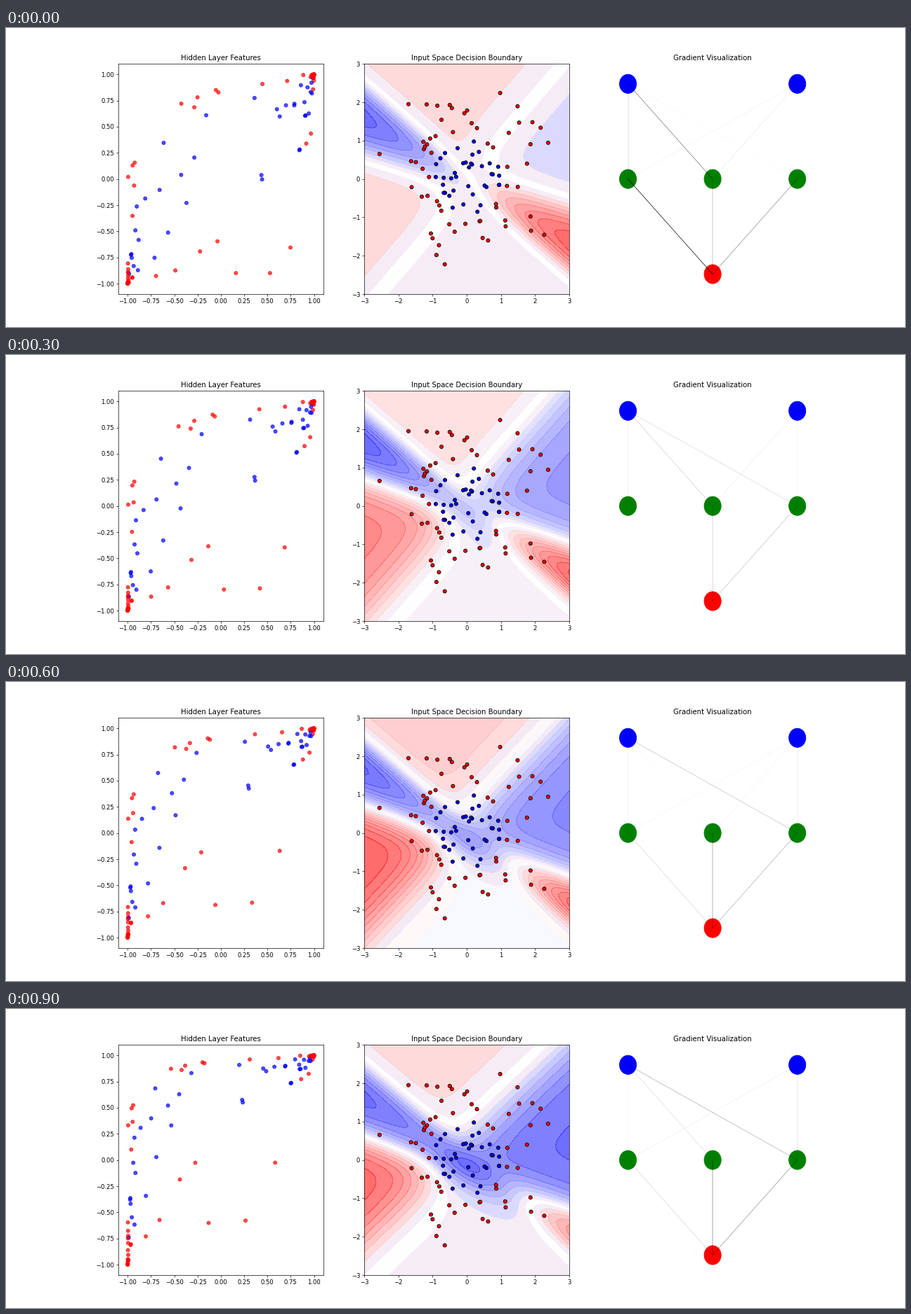
Recreate the animation shown at these times as a matplotlib script. Size 1280x427 px, loop 1000 ms.

```python
import numpy as np
import matplotlib.pyplot as plt
from matplotlib.animation import FuncAnimation
from matplotlib.colors import ListedColormap
from matplotlib.patches import Circle

DPI = 1280 / 21
FRAMES = 10
STEPS_PER_FRAME = 10
RATE = 0.1


def make_data(count=100):
    np.random.seed(0)
    points = np.random.randn(count, 2)
    labels = np.where((points ** 2).sum(axis=1) > 1, 1, -1)
    return points, labels


class Network:
    """Two inputs, three tanh units and one linear output."""

    def __init__(self):
        np.random.seed(0)
        self.w1 = np.random.randn(2, 3)
        self.w2 = np.random.randn(3, 1)
        self.b1 = np.zeros(3)
        self.b2 = np.zeros(1)

    def hidden(self, x):
        return np.tanh(x @ self.w1 + self.b1)

    def predict(self, x):
        return self.hidden(x) @ self.w2 + self.b2

    def train(self, x, y):
        h = self.hidden(x)
        error = (h @ self.w2 + self.b2 - y[:, None]) / len(x)
        back = error @ self.w2.T * (1 - h ** 2)
        g1, g2 = x.T @ back, h.T @ error
        self.w1 -= RATE * g1
        self.b1 -= RATE * back.sum(axis=0)
        self.w2 -= RATE * g2
        self.b2 -= RATE * error.sum(axis=0)
        return g1, g2


def boundary_map():
    """Blue to white to red, with lavender for the palest tints."""
    t = np.linspace(-1, 1, 256)
    tint = 1 - abs(t)
    red = np.where(t > 0, 1, tint)
    blue = np.where(t < 0, 1, tint)
    pale = (abs(t) > 0.06) & (abs(t) < 0.18)
    red[pale] = blue[pale] = (1 + tint[pale]) / 2
    return ListedColormap(np.column_stack([red, tint, blue]))


def record(x, y, grid):
    """Train once and keep what each frame shows."""
    net = Network()
    for _ in range(STEPS_PER_FRAME):
        net.train(x, y)
    states = []
    for _ in range(FRAMES):
        for _ in range(STEPS_PER_FRAME):
            g1, g2 = net.train(x, y)
        states.append((net.hidden(x), net.predict(grid), g1, g2))
    return states


X, Y = make_data()
XX, YY = np.meshgrid(np.linspace(-3, 3, 100), np.linspace(-3, 3, 100))
STATES = record(X, Y, np.column_stack([XX.ravel(), YY.ravel()]))
TINTS = boundary_map()

INPUTS = [(0, 1), (1, 1)]
HIDDEN = [(0, 0.5), (0.5, 0.5), (1, 0.5)]
OUTPUT = [(0.5, 0)]

# The tiny surplus keeps the pixel size from rounding down.
fig = plt.figure(figsize=(1280.001 / DPI, 427.001 / DPI), dpi=DPI)
ax_hidden, ax_input, ax_grad = (fig.add_subplot(1, 3, i) for i in (1, 2, 3))


def draw_hidden(h):
    ax_hidden.clear()
    ax_hidden.scatter(h[:, 0], h[:, 1], c=Y, cmap="bwr", alpha=0.7)
    ax_hidden.set_title("Hidden Layer Features")


def draw_boundary(z):
    ax_input.clear()
    ax_input.contourf(XX, YY, z.reshape(XX.shape), levels=20, cmap=TINTS, alpha=0.6)
    ax_input.scatter(X[:, 0], X[:, 1], c=Y, cmap="bwr", edgecolors="k")
    ax_input.set(xlim=(-3, 3), ylim=(-3, 3), title="Input Space Decision Boundary")


def draw_edges(starts, ends, grads):
    for (xa, ya), row in zip(starts, grads):
        for (xb, yb), g in zip(ends, row):
            ax_grad.plot([xa, xb], [ya, yb], "k-", linewidth=10 * abs(g))


def draw_gradients(g1, g2):
    ax_grad.clear()
    ax_grad.axis("off")
    for nodes, color in ((INPUTS, "blue"), (HIDDEN, "green"), (OUTPUT, "red")):
        for node in nodes:
            ax_grad.add_patch(Circle(node, 0.05, color=color))
    draw_edges(INPUTS, HIDDEN, g1)
    draw_edges(HIDDEN, OUTPUT, g2)
    ax_grad.set(xlim=(-0.105, 1.105), ylim=(-0.105, 1.105),
                title="Gradient Visualization")


def update(frame):
    h, z, g1, g2 = STATES[frame % FRAMES]
    draw_hidden(h)
    draw_boundary(z)
    draw_gradients(g1, g2)
    return []


anim = FuncAnimation(fig, update, frames=FRAMES, interval=100, repeat=True,
                     repeat_delay=0, init_func=lambda: update(0))
plt.show()
```
